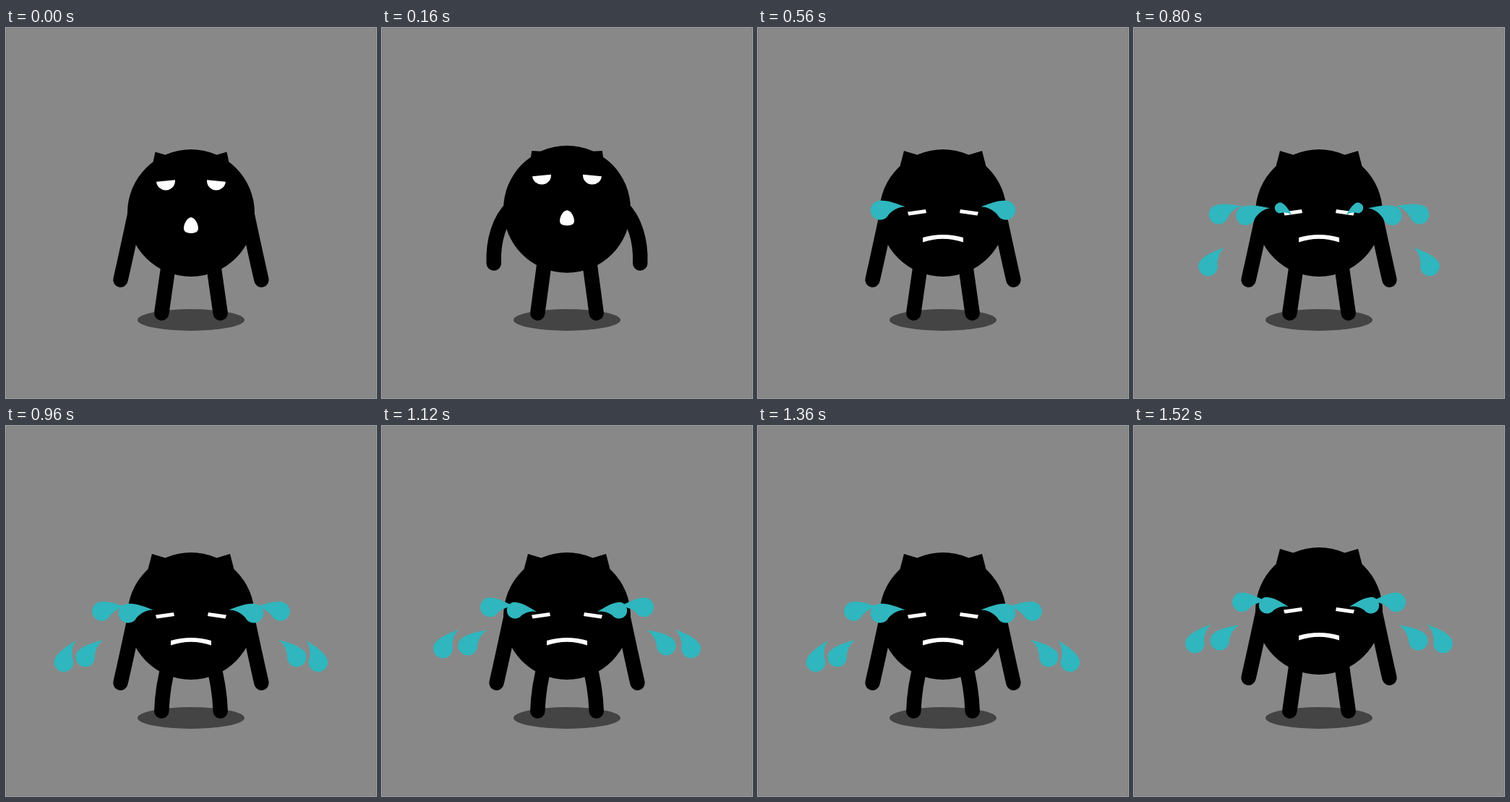
An HTML page with a canvas for the animation above (1600 ms loop, 512x512 px).

```html
<!DOCTYPE html>
<html lang="en">
<head>
<meta charset="utf-8">
<title>Sobbing blob</title>
<style>
  html, body { margin: 0; height: 100%; overflow: hidden; background: #888; }
  canvas { display: block; width: 100vw; height: 100vh; }
</style>
</head>
<body>
<canvas id="stage" width="512" height="512"></canvas>
<script>
const LOOP = 1600, STEP = 80;
const INHALED = 320, CRY = 480, SOB = 560, SOB_PERIOD = 240, TEAR_GAP = 200;
const ctx = document.getElementById('stage').getContext('2d');

const armDown = [[180, 250], [173, 283], [166, 316], [158.5, 348.5]];
const armBent = [[180, 257], [152, 257], [141, 283], [151, 313]];

// Two jets of tears, each along a Bezier arc
const jets = [
  { first: 480, life: 320, arc: [[200, 248], [157, 243], [119, 284], [102.5, 330]] },
  { first: 600, life: 360, arc: [[202, 249], [151, 226], [87, 260], [80, 320]] }
];

const mix = (a, b, k) => a + (b - a) * k;
const mixPoint = (p, q, k) => p.map((v, i) => mix(v, q[i], k));
const ease = k => Math.sin(k * Math.PI / 2) ** 2;

// Point on a Bezier curve and the angle looking back along it
function follow(points, k) {
  while (points.length > 2) {
    points = points.slice(1).map((p, i) => mixPoint(points[i], p, k));
  }
  const [a, b] = points;
  return { at: mixPoint(a, b, k), back: Math.atan2(a[1] - b[1], a[0] - b[0]) };
}

function poly(...points) {
  ctx.beginPath();
  points.forEach(p => ctx.lineTo(...p));
  ctx.closePath();
  ctx.fill();
}

function ellipse(x, y, rx, ry, end = Math.PI * 2) {
  ctx.beginPath();
  ctx.ellipse(x, y, rx, ry, 0, 0, end);
  ctx.fill();
}

function placed(x, y, angle, size, paint) {
  ctx.save();
  ctx.translate(x, y);
  ctx.rotate(angle);
  ctx.scale(size, size);
  paint();
  ctx.restore();
}

function bothSides(paint) {
  paint();
  ctx.save();
  ctx.translate(512, 0);
  ctx.scale(-1, 1);
  paint();
  ctx.restore();
}

function leg(dy) {
  const bow = Math.max(0, dy) * .6;
  ctx.beginPath();
  ctx.moveTo(226, 320 + dy);
  ctx.quadraticCurveTo(220.6 - bow, 357 + dy / 2, 215.3, 394.5);
  ctx.stroke();
}

function arm(bend) {
  const [start, ...rest] = armDown.map((p, i) => mixPoint(p, armBent[i], bend));
  ctx.beginPath();
  ctx.moveTo(...start);
  ctx.bezierCurveTo(...rest.flat());
  ctx.stroke();
}

function ear(breath, low) {
  const tip = [206.5 + 1.5 * breath - 4.5 * low, 171.5 + 7.5 * breath - 1.5 * low];
  poly(tip, [222, 176], [222, 200], [202 + 5 * breath - 6 * low, 193]);
}

function openEye(y, breath) {
  placed(221, y, -.1, 1, () => ellipse(0, 0, 13, 13 - breath, Math.PI));
}

function openMouth(y, h) {
  const half = () => {
    ctx.beginPath();
    ctx.moveTo(256.5, y - h);
    ctx.bezierCurveTo(250, y - h, 246, y - 1, 246, y + 4);
    ctx.bezierCurveTo(246, y + 9, 250, y + h, 256.5, y + h);
    ctx.fill();
  };
  bothSides(half);
}

function shutEye(y) {
  poly([207, y - .5], [232, y - 4], [233, y + 1], [208.5, y + 4.5]);
}

function frown(y) {
  ctx.beginPath();
  ctx.moveTo(228, y);
  ctx.quadraticCurveTo(256, y - 8, 284, y);
  ctx.lineTo(284, y + 6.5);
  ctx.quadraticCurveTo(256, y - 3, 228, y + 6.5);
  ctx.fill();
}

function drop() {
  ctx.beginPath();
  ctx.moveTo(0, -13.3);
  ctx.bezierCurveTo(12, -13.3, 24, -7, 35, -2);
  ctx.bezierCurveTo(26, -3, 18, 1, 11.5, 6.7);
  ctx.arc(0, 0, 13.3, .53, Math.PI * 1.5);
  ctx.fill();
}

function cry(t) {
  for (const { first, life, arc } of jets) {
    for (let born = first; born <= t; born += TEAR_GAP) {
      const age = t - born;
      if (age > life) continue;
      const { at, back } = follow(arc, age / life);
      placed(...at, .24 + .85 * back, Math.min(1, .55 + age / 133), drop);
    }
  }
}

function draw(t) {
  const breath = t < INHALED ? ease(t / INHALED)
    : t < SOB ? ease((SOB - t) / (SOB - INHALED)) : 0;
  const low = t < INHALED ? 0 : 1 - breath;
  const dy = t < SOB ? -10.4 * breath
    : 9.3 * Math.sin(Math.PI * (t - SOB) / SOB_PERIOD) ** 2;

  ctx.fillStyle = '#888';
  ctx.fillRect(0, 0, 512, 512);
  ctx.strokeStyle = '#808080';
  ctx.lineWidth = 1;
  ctx.strokeRect(.5, .5, 511, 511);
  ctx.fillStyle = '#444';
  ellipse(256, 404, 74, 15);

  ctx.fillStyle = ctx.strokeStyle = '#000';
  ctx.lineWidth = 20.5;
  ctx.lineCap = 'round';
  bothSides(() => leg(dy));

  ctx.save();
  ctx.translate(0, dy);
  bothSides(() => {
    arm(breath);
    ear(breath, low);
  });
  ellipse(256, 256, 88, 88);

  ctx.fillStyle = '#fff';
  const eyeY = mix(211.5 - 4.5 * breath, 255, low);
  const mouthY = mix(273 - 10 * breath, 290, low);
  if (t < CRY) {
    bothSides(() => openEye(eyeY, breath));
    openMouth(mouthY, 11 - breath);
  } else {
    bothSides(() => shutEye(eyeY));
    frown(mouthY);
  }

  ctx.fillStyle = '#30b6be';
  bothSides(() => cry(t));
  ctx.restore();
}

function tick() {
  draw(Math.floor(performance.now() % LOOP / STEP) * STEP);
  requestAnimationFrame(tick);
}
tick();
</script>
</body>
</html>
```
